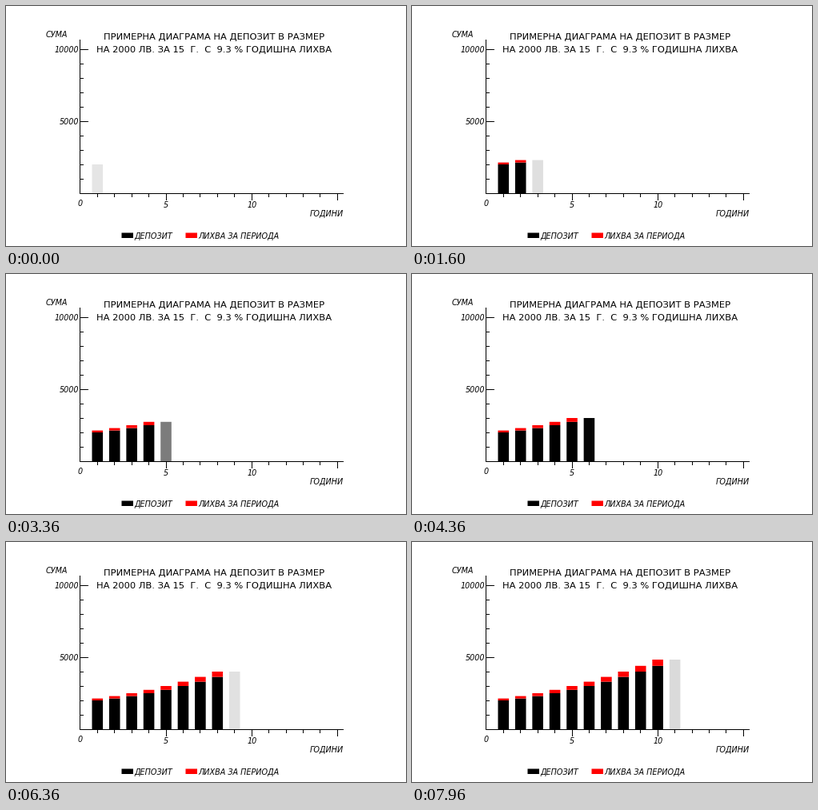
These frames come from a looping animation (500 px wide and 300 px high, 8000 ms). A matplotlib script:

```python
import matplotlib.pyplot as plt
from matplotlib.animation import FuncAnimation
from matplotlib.patches import Rectangle

W, H, DPI = 500, 300, 100
FRAMES, INTERVAL = 200, 40
X0, Y0, YEAR = 92, 234, 21.43   # origin and width of one year
PERIOD, FADE = 19.85, 10        # frames per bar and per fade

fig = plt.figure(figsize=(W / DPI, H / DPI), dpi=DPI, facecolor="white")
ax = fig.add_axes([0, 0, 1, 1])
ax.set_xlim(0, W)
ax.set_ylim(H, 0)
ax.axis("off")


def box(x, y, w, h, color="black"):
    return ax.add_patch(Rectangle((x, y), w, h, facecolor=color, linewidth=0, snap=False))


def label(x, base, text, px=9.7, ha="left", style="italic"):
    ax.text(x, base, text, fontsize=px * 72 / DPI, family="DejaVu Sans",
            style=style, ha=ha, va="baseline")


def title(base, text):
    label(260.5, base, text, 11.5, "center", "normal")


def height(year):
    """Savings in pixels after a number of years."""
    return 36 + 2.1 * year + .3 * year ** 2


title(42, "ПРИМЕРНА ДИАГРАМА НА ДЕПОЗИТ В РАЗМЕР")
title(58, "НА 2000 ЛВ. ЗА 15  Г.  С  9.3 % ГОДИШНА ЛИХВА")
label(50, 39, "СУМА")
label(379.5, 262.5, "ГОДИНИ")

# Axes with a longer tick at every fifth step
box(X0, 42, 1, Y0 - 41)
box(X0, Y0, 330, 1)
for i in range(1, 11):
    major = i % 5 == 0
    box(X0, Y0 - 18 * i, 11 if major else 5, 1)
    if major:
        label(91.5, Y0 - 18 * i + 4, str(1000 * i), ha="right")
for i in range(16):
    major = i % 5 == 0
    if i:
        box(int(X0 + .9 + YEAR * i), Y0, 1, 9 if major else 5)
    if major and i < 15:
        label(X0 + 1 + YEAR * i, 252 if i else 250.5, str(i), ha="center")

for x, color, text in ((144.5, "black", "ДЕПОЗИТ"), (224.5, "red", "ЛИХВА ЗА ПЕРИОДА")):
    box(x, 283.5, 14.5, 6.5, color)
    label(x + 16, 290.5, text)

# One bar per year: the deposit fades in, then the interest on top of it
bars = []
for k in range(11):
    x, low, high = 107.5 + YEAR * k, height(k), height(k + 1)
    bars.append((PERIOD * k, 0, box(x, Y0 - low, 13.6, low)))
    bars.append((PERIOD * k + FADE, 1, box(x, Y0 - high, 13.6, high - low)))


def draw(n):
    for start, red, bar in bars:
        f = min(max((n - start) / FADE, 0), 1)
        bar.set_visible(n >= start)
        bar.set_facecolor((red * f, 0, 0, .1 + .9 * f))
    return [bar for _, _, bar in bars]


anim = FuncAnimation(fig, draw, frames=FRAMES, interval=INTERVAL,
                     repeat=True, repeat_delay=0, init_func=lambda: draw(0))
plt.show()
```
